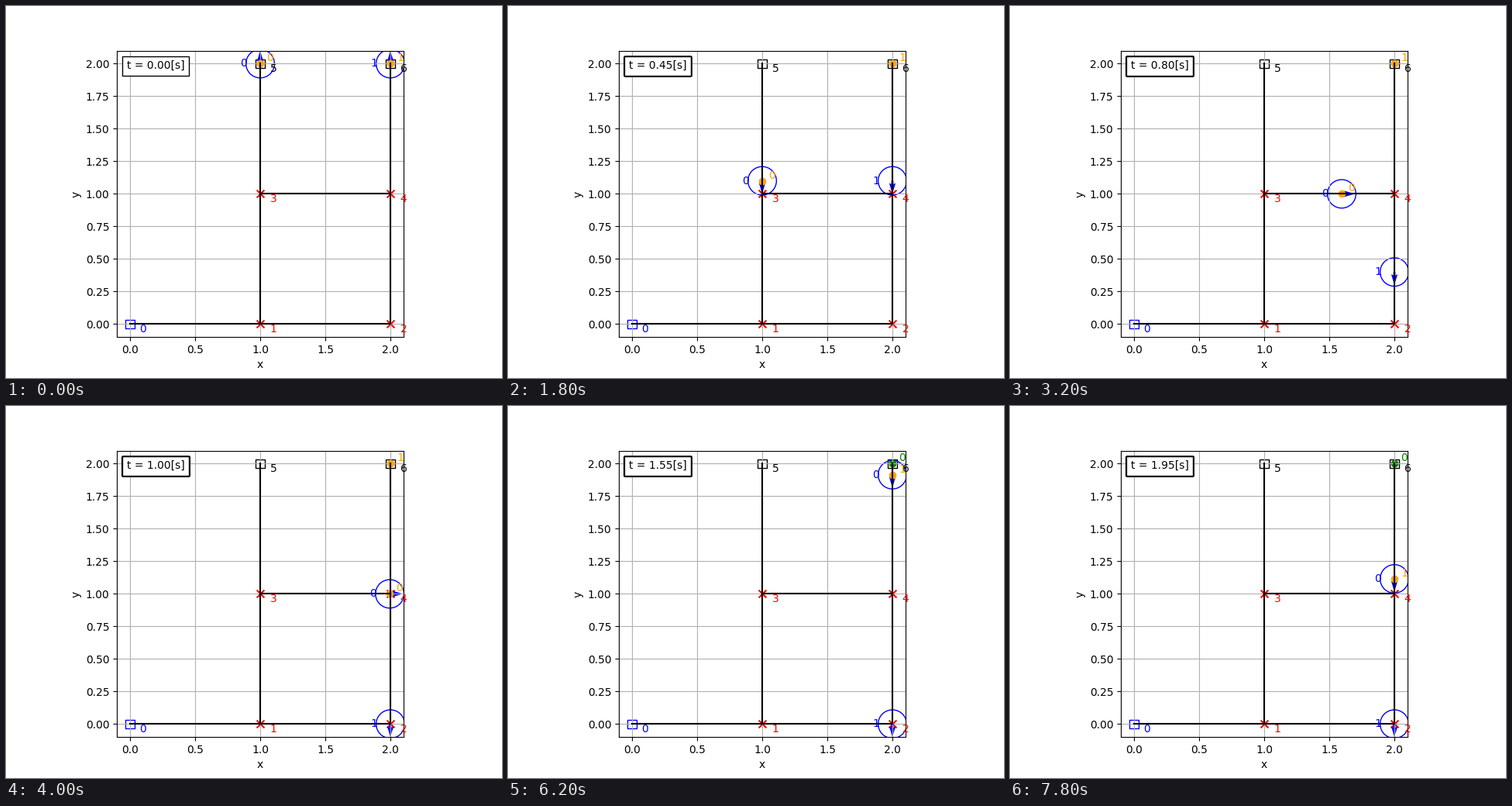
A matplotlib script that plays this animation: 640x480 px, repeating every 8 s.

```python
import math
import matplotlib.pyplot as plt
from matplotlib.animation import FuncAnimation
from matplotlib.offsetbox import AnchoredText

FRAMES, INTERVAL, DT = 40, 200, 0.05
SPEED, TURN = 2.0, 0.0025       # units per second, seconds lost at a turn
DROP_TIME = 1.505

NODES = [(0, 0), (1, 0), (2, 0), (1, 1), (2, 1), (1, 2), (2, 2)]
COLORS = ["blue"] + ["red"] * 4 + ["black"] * 2
EDGES = [(0, 1), (1, 2), (1, 3), (2, 4), (3, 4), (3, 5), (4, 6)]
ROUTES = [[(1, 2), (1, 1), (2, 1), (2, 2), (2, 0)],
          [(2, 2), (2, 0)]]

fig, ax = plt.subplots(figsize=(6.4, 4.8), dpi=100)
ax.set(xlim=(-0.1, 2.1), ylim=(-0.1, 2.1), xlabel="x", ylabel="y")
ax.set_aspect("equal")
ax.grid(True)


def ride(route, t):
    """Position and unit heading on a route at time t."""
    if t == 0:
        return route[0], (0, 1)
    for (x0, y0), (x1, y1) in zip(route, route[1:]):
        length = math.hypot(x1 - x0, y1 - y0)
        heading = (x1 - x0) / length, (y1 - y0) / length
        span = length / SPEED
        if t <= span:
            d = SPEED * t
            return (x0 + d * heading[0], y0 + d * heading[1]), heading
        t = max(0, t - span - TURN)
    return route[-1], heading


for a, b in EDGES:
    ax.plot(*zip(NODES[a], NODES[b]), color="black")

for i, ((x, y), color) in enumerate(zip(NODES, COLORS)):
    if color == "red":
        ax.scatter(x, y, s=50, marker="x", color=color)
    else:
        ax.scatter(x, y, s=70, marker="s", facecolor="none", edgecolor=color)
    ax.text(x + 0.075, y, str(i), color=color, ha="left", va="top")


class Agent:
    def __init__(self, name, route):
        self.route = route
        self.ring = ax.scatter(*route[0], s=700, facecolor="none",
                               edgecolor="blue")
        self.arrow = ax.quiver(*route[0], 0, 0.1, color="blue", angles="uv",
                               scale_units="xy", scale=1)
        self.label = ax.text(0, 0, name, color="blue", ha="right", va="center")

    def update(self, t):
        (x, y), (u, v) = ride(self.route, t)
        self.ring.set_offsets([(x, y)])
        self.arrow.set_offsets([(x, y)])
        self.arrow.set_UVC([0.1 * u], [0.1 * v])
        self.label.set_position((x - 0.1, y))
        return x, y


class Parcel:
    def __init__(self, name):
        self.dot = ax.scatter(0, 0, s=36)
        self.label = ax.text(0, 0, name, ha="left", va="bottom")

    def update(self, pos, color):
        x, y = pos
        self.dot.set_offsets([pos])
        self.dot.set_color(color)
        self.label.set_position((x + 0.05, y))
        self.label.set_color(color)


agents = [Agent(str(i), route) for i, route in enumerate(ROUTES)]
parcels = [Parcel(str(i)) for i in range(2)]

# Clock boxes pile up, so their soft edges darken with time.
clocks = [ax.add_artist(AnchoredText(f"t = {k * DT:.2f}[s]", loc="upper left"))
          for k in range(FRAMES)]


def update(frame):
    t = frame * DT
    carrier, _ = [agent.update(t) for agent in agents]
    depot = NODES[6]
    if t < DROP_TIME:
        parcels[0].update(carrier, "orange")
        parcels[1].update(depot, "orange")
    else:
        parcels[0].update(depot, "green")
        parcels[1].update(carrier, "orange")
    for k, clock in enumerate(clocks):
        clock.set_visible(k <= frame)
    return []


anim = FuncAnimation(fig, update, frames=FRAMES, interval=INTERVAL,
                     repeat=True, repeat_delay=0, blit=False)
plt.show()
```
